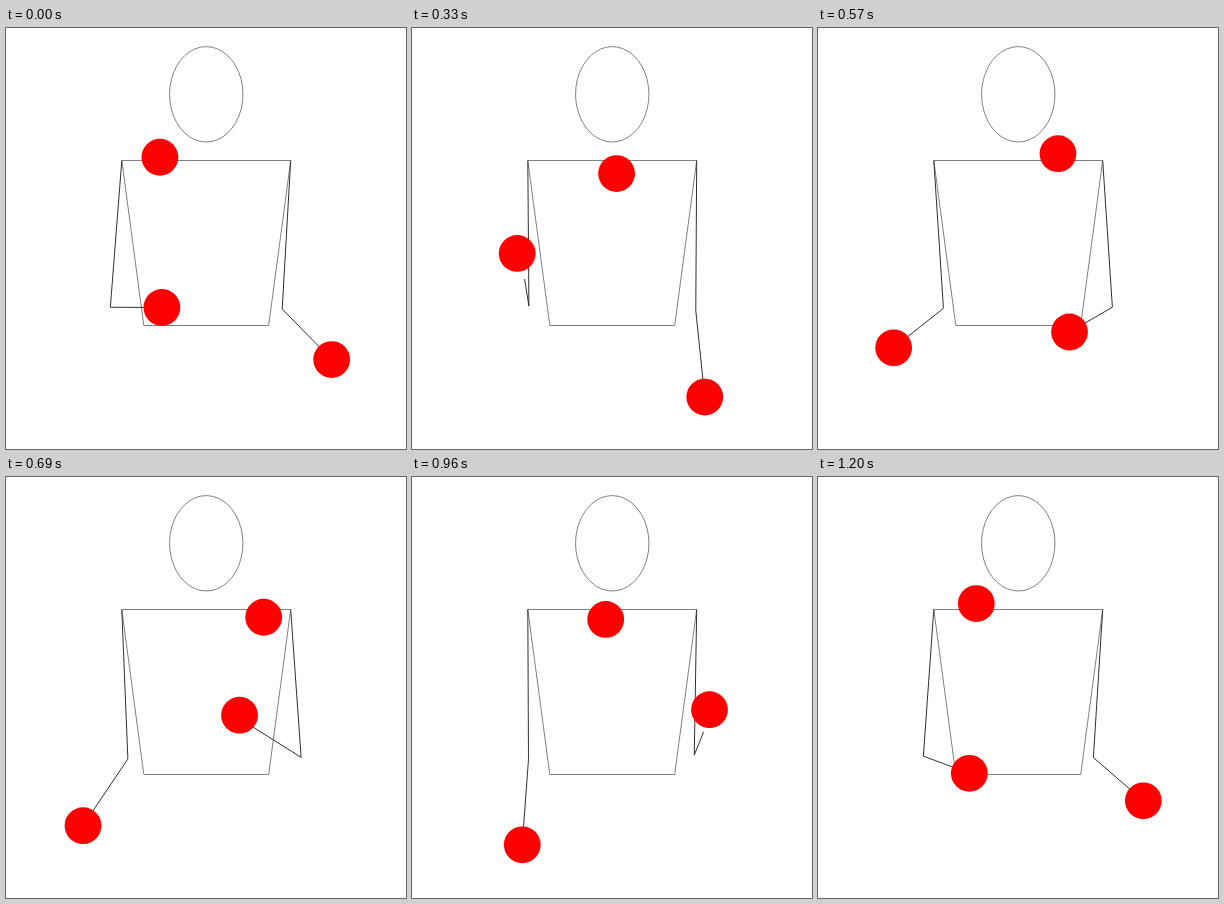
Write an HTML page with a canvas that moves like this. It is 400 by 421 pixels and loops after 1.23 s.

```html
<!DOCTYPE html>
<html lang="en">
<head>
<meta charset="utf-8">
<title>Three-ball cascade</title>
<style>
  html, body { margin: 0; height: 100%; overflow: hidden; background: #fff; }
  canvas { display: block; }
</style>
</head>
<body>
<canvas id="stage" width="400" height="421"></canvas>
<script>
const ctx = document.getElementById('stage').getContext('2d');

const LOOP = 1230, STEP = 30;      // ms
const FLIGHT = 1046;               // ms in the air
const CATCH_AT = 431;              // ms after a throw when the same hand catches
const MID = 200.25;                // mirror axis
const BALL = 18.4;
const ARM = 150.5, REACH = 110;    // arm segment length, depth of the hands
const SHOULDER = { x: 115.8, y: 132.5 };

// Left-hand events; the right hand mirrors them half a loop later.
const toss = { x: 155.9, y: 279.5, vx: 0.1475, vy: -0.593 };
const grab = { x: 90.2, y: 279.5, vx: -0.178, vy: 0.3 };

const hermite = (a, va, b, vb, span, s) =>
  a + (b - a) * s * s * (3 - 2 * s) +
  span * (va * s * (1 - s) ** 2 + vb * s * s * (s - 1));

function handAt(t) {
  const carrying = t >= CATCH_AT;
  const [a, b] = carrying ? [grab, toss] : [toss, grab];
  const span = carrying ? LOOP - CATCH_AT : CATCH_AT;
  const s = (carrying ? t - CATCH_AT : t) / span;
  return {
    x: hermite(a.x, a.vx, b.x, b.vx, span, s),
    y: hermite(a.y, a.vy, b.y, b.vy, span, s)
  };
}

const flightAt = t => ({
  x: toss.x + toss.vx * t,
  y: toss.y + toss.vy * t * (1 - t / FLIGHT)
});

// The elbow hangs in the vertical plane through shoulder and hand.
function elbowFor(hand) {
  const dx = hand.x - SHOULDER.x, dy = hand.y - SHOULDER.y;
  const flat = Math.hypot(dx, REACH), dist = Math.hypot(flat, dy);
  const drop = Math.sqrt(Math.max(0, ARM * ARM - dist * dist / 4));
  const out = flat / 2 - drop * dy / dist;
  return {
    x: SHOULDER.x + dx * out / flat,
    y: SHOULDER.y + dy / 2 + drop * flat / dist
  };
}

function line(points, color, closed) {
  ctx.beginPath();
  for (const p of points) ctx.lineTo(p.x, p.y);
  if (closed) ctx.closePath();
  ctx.strokeStyle = color;
  ctx.stroke();
}

function drawBody() {
  const head = Array.from({ length: 40 }, (_, i) => {
    const a = i * Math.PI / 20;
    return { x: MID + 36.7 * Math.cos(a), y: 66.3 + 47.7 * Math.sin(a) };
  });
  line(head, '#808080', true);
  line([
    SHOULDER, { x: 2 * MID - SHOULDER.x, y: SHOULDER.y },
    { x: 262.7, y: 297.5 }, { x: 137.8, y: 297.5 }
  ], '#808080', true);
}

function draw(now) {
  const time = Math.floor(now % LOOP / STEP) * STEP;
  const balls = [];
  ctx.clearRect(0, 0, 400, 421);
  ctx.lineWidth = 1;
  drawBody();

  for (const right of [false, true]) {
    const t = (time + (right ? LOOP / 2 : 0)) % LOOP;
    const place = p => right ? { x: 2 * MID - p.x, y: p.y } : p;
    const hand = handAt(t);
    line([SHOULDER, elbowFor(hand), hand].map(place), '#303030');
    if (t < FLIGHT) balls.push(place(flightAt(t)));
    if (t >= CATCH_AT) balls.push(place(hand));
  }

  ctx.fillStyle = '#f00';
  for (const { x, y } of balls) {
    ctx.beginPath();
    ctx.arc(x, y, BALL, 0, 2 * Math.PI);
    ctx.fill();
  }
  requestAnimationFrame(draw);
}

draw(performance.now());
</script>
</body>
</html>
```
